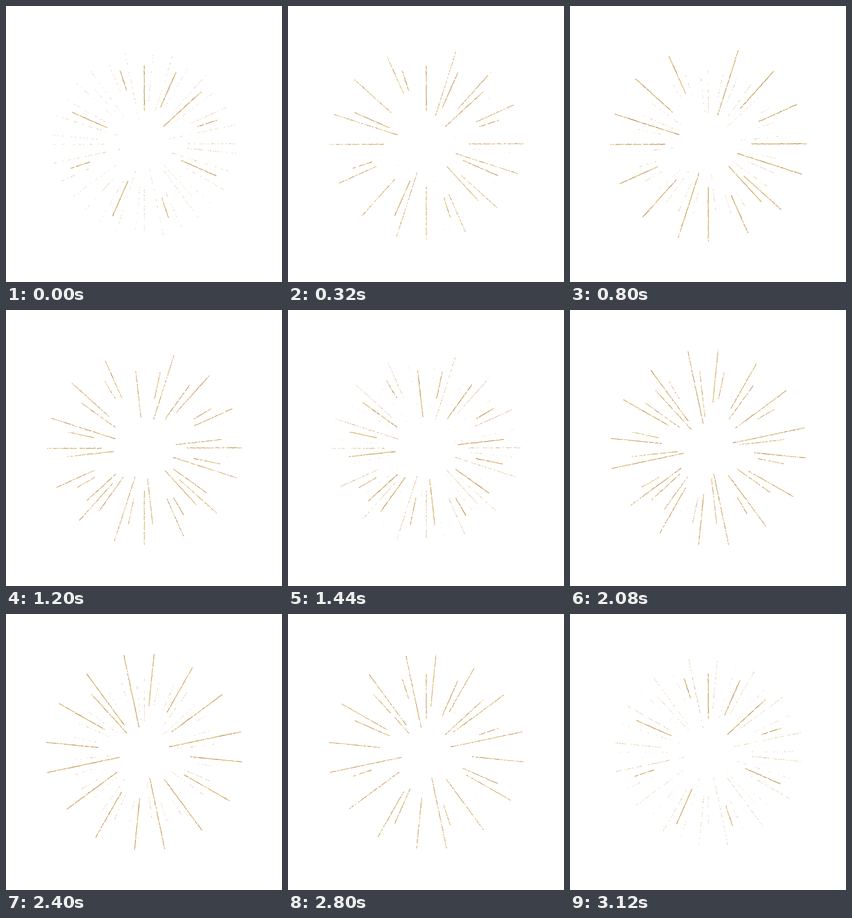
An HTML page with a canvas that plays this animation: 480x480 px, repeating every 3.2 s.

```html
<!DOCTYPE html>
<html lang="en">
<head>
<meta charset="utf-8">
<title>Golden burst</title>
<style>
  html, body { margin: 0; width: 100%; height: 100%; overflow: hidden; background: #fff; }
  canvas { display: block; width: 100vw; height: 100vh; }
</style>
</head>
<body>
<canvas id="stage" width="480" height="480"></canvas>
<script>
const LOOP = 3200, STEP = 80, SHRINK = 0.13, GRAIN = 1.6, ROUGH = 0.7;
const GOLDS = ['#c79c4c', '#d3a955', '#b48544', '#c39450', '#dab35e'];
const ctx = document.getElementById('stage').getContext('2d');

// Rays are [clockwise degrees from the top, inner radius, outer radius].
// "quarter" rays repeat every 90 degrees, "single" rays occur once.
const groups = [
  { peak: 0,
    quarter: [[23.8, 70, 137], [71.8, 98, 135]],
    single: [[0, 58, 136.5], [47.4, 45, 136.5]] },
  { peak: 800,
    quarter: [[17.8, 53, 171], [41.9, 83, 170.5], [65.9, 96, 169]],
    single: [[89.8, 75, 171], [180, 75, 169.5], [269.8, 75, 170.5], [137.4, 52, 136.5]] },
  { peak: 1600,
    quarter: [[11.8, 88, 136], [35.7, 62.5, 136], [59.5, 101, 136], [83.7, 54, 136]],
    single: [[227.6, 68, 136.5]] },
  { peak: 2400,
    quarter: [[5.7, 80.5, 171], [29.7, 79.5, 171], [53.6, 59, 169], [78.1, 44, 172.5]],
    single: [[317.6, 44.6, 136.5]] }
];

function randomFrom(seed) {
  return () => {
    seed = (seed * 1664525 + 1013904223) >>> 0;
    return seed / 4294967296;
  };
}

const rand = randomFrom(71);

// Split a ray into foil grains, each with its own colour, sideways shift and fade threshold.
function makeRay([deg, inner, outer]) {
  const angle = (deg - 90) * Math.PI / 180;
  const grains = [];
  let hue = 0, left = 0;
  for (let r = inner; r < outer; r += GRAIN) {
    if (left-- <= 0) {
      hue = Math.floor(rand() * GOLDS.length);
      left = Math.floor(rand() * 6);
    }
    const shift = (rand() - 0.5) * ROUGH;
    grains.push({ from: r, to: Math.min(r + GRAIN, outer), hue, shift, limit: rand() });
  }
  return { x: Math.cos(angle), y: Math.sin(angle), grains };
}

for (const g of groups) {
  const turned = [0, 90, 180, 270].flatMap(turn =>
    g.quarter.map(([deg, a, b]) => [deg + turn, a, b]));
  g.rays = [...turned, ...g.single].map(makeRay);
}

const easeInOut = p => p < 0.5 ? 4 * p ** 3 : 1 - 4 * (1 - p) ** 3;

function drawGroup(group, time) {
  const gap = Math.abs(time - group.peak);
  const away = Math.min(gap, LOOP - gap) / (LOOP / 2);
  const glow = 1 - easeInOut(away);
  if (glow < 0.04) return;

  const scale = 1 - SHRINK * (1 - glow);
  const cover = 0.93 * glow ** 1.8;
  ctx.lineWidth = 0.85 + 0.4 * glow ** 5;
  ctx.globalAlpha = 0.45 + 0.55 * glow;

  GOLDS.forEach((gold, hue) => {
    ctx.beginPath();
    for (const { x, y, grains } of group.rays) {
      for (const grain of grains) {
        if (grain.hue !== hue || grain.limit > cover) continue;
        const a = grain.from * scale, b = grain.to * scale;
        const dx = -y * grain.shift, dy = x * grain.shift;
        ctx.moveTo(x * a + dx, y * a + dy);
        ctx.lineTo(x * b + dx, y * b + dy);
      }
    }
    ctx.strokeStyle = gold;
    ctx.stroke();
  });
}

const start = performance.now();

function draw() {
  const elapsed = Math.max(0, performance.now() - start) % LOOP;
  const time = Math.floor(elapsed / STEP) * STEP;
  ctx.setTransform(1, 0, 0, 1, 0, 0);
  ctx.globalAlpha = 1;
  ctx.clearRect(0, 0, 480, 480);
  ctx.translate(240.5, 240.2);
  groups.forEach(g => drawGroup(g, time));
  requestAnimationFrame(draw);
}

draw();
</script>
</body>
</html>
```
